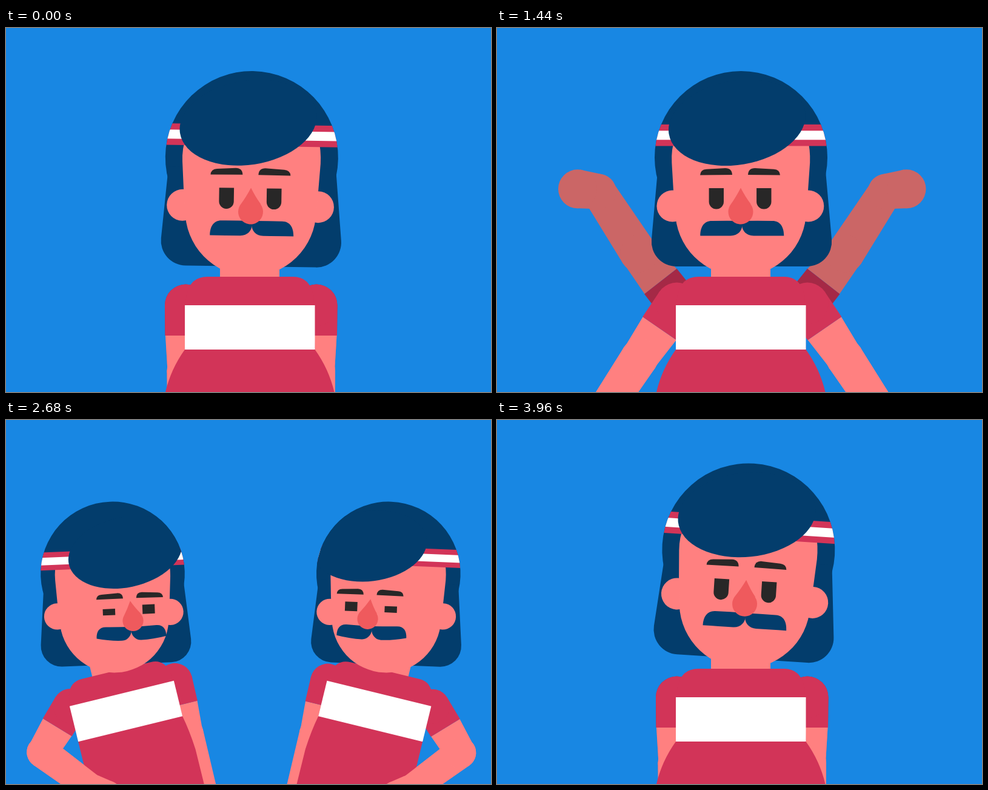
Animation of 800 by 600 pixels, one loop 4 s. Source, as an HTML page with a canvas:

```html
<!DOCTYPE html>
<html lang="en">
<head>
<meta charset="utf-8">
<title>Two brothers</title>
<style>
html, body { margin: 0; width: 100%; height: 100%; overflow: hidden; background: #1887e3; }
canvas { display: block; width: 800px; height: 600px; }
</style>
</head>
<body>
<canvas id="stage" width="800" height="600"></canvas>
<script>
const ctx = document.getElementById('stage').getContext('2d');
const LOOP = 4000, RAD = Math.PI / 180, TAU = Math.PI * 2;
const BLUE = '#1887e3', HAIR = '#033d6c', INK = '#282727', NOSE = '#ef5a5d', THUMB = '#f28585';
const SKIN = '#ff8080', RED = '#d23458';
const SKIN_SHADES = [[255, 128, 128], [203, 102, 102]], RED_SHADES = [[210, 52, 88], [165, 41, 70]];

const lerp = (a, b, k) => a + (b - a) * k;
const ease = k => k < .5 ? 4 * k * k * k : 1 - Math.pow(2 - 2 * k, 3) / 2;
const mix = ([a, b], k) => `rgb(${a.map((v, i) => Math.round(lerp(v, b[i], k)))})`;

function track(keys, t) {
  if (t <= keys[0][0]) return keys[0][1];
  for (let i = 1; i < keys.length; i++) {
    const [t0, v0] = keys[i - 1], [t1, v1] = keys[i];
    if (t < t1) return lerp(v0, v1, ease((t - t0) / (t1 - t0)));
  }
  return keys[keys.length - 1][1];
}

// Poses: upper arm, forearm and hand angle from straight down, shoulder drop
const HANG = [0, 1, 0, 0], UP = [142, 147, 97, 0], UP2 = [142, 155, 99, 0], DOWN = [34.5, 33.5, 30, -3],
  WIDE = [56.5, 54.6, 48, 26], AKIMBO = [79, 7, -45, -12], HIP = [45, -40, -48, 0], RAISED = [17.5, 162, 160, 0];
const LAG = [0, 45, 90, 0];

const frontStart = [[30, HANG], [370, UP], [620, UP], [1020, DOWN], [1720, DOWN], [2150, UP2], [2290, UP2]];
const backStart = [[30, HANG], [390, WIDE], [560, WIDE], [1020, UP], [1720, UP], [2180, AKIMBO], [2290, AKIMBO]];
const outerEnd = [[2570, HIP], [3440, HIP], [3820, HANG]];
const innerEnd = [[2570, HANG], [2800, HANG], [3110, RAISED], [3430, RAISED], [3820, HANG]];
const ARMS = {
  front: { outer: [...frontStart, ...outerEnd], inner: [...frontStart, ...innerEnd] },
  back: { outer: [...backStart, ...outerEnd], inner: [...backStart, ...innerEnd] }
};
const SPLIT = [[2290, 0], [2640, 1], [3450, 1], [3860, 0]];
const LOOK = [[2300, 0], [2560, 1], [2700, 1], [2920, 0]];
const LID = [[2540, 1], [2660, .36], [2710, .36], [2820, 1]];
const SMIRK = [[2900, 0], [3160, 1], [3430, 1], [3640, 0]];
const GRIN = [[3020, 0], [3280, 1], [3420, 1], [3600, 0]];
const FINGER = [[3040, 0], [3200, 1], [3430, 1], [3560, 0]];
const DROOP = [[2150, 0], [2280, 4], [2640, -4], [2700, -4], [2900, 0]];
const BOB = [[1900, 0], [2200, -2], [2290, -2], [2640, 1], [2720, 1], [3000, -2], [3450, -2], [3860, 0]];
const THUMB_TILT = [[2000, 0], [2260, 20], [3000, 0]];
const TILT = {
  front: [[0, .85], [1400, 0], [2290, 0], [2640, 2.3], [3450, 2.3], [3760, 10], [3850, 10], [3920, 7.5], [3960, 3.7], [4000, .85]],
  back: [[0, .85], [1400, 0], [2290, 0], [2640, -2.3], [3450, -2.3], [3800, 10]]
};
const NOD_LEAD = 150; // the front brother lifts his head first

function shape(color, draw) {
  ctx.fillStyle = color;
  ctx.beginPath();
  draw();
  ctx.fill();
}
const disc = (x, y, r, color) => shape(color, () => ctx.arc(x, y, r, 0, TAU));
const box = (x, y, w, h, r, color) => shape(color, () => ctx.roundRect(x, y, w, h, r));
function group(draw) {
  ctx.save();
  draw();
  ctx.restore();
}

function bar(a, ra, b, rb, color) {
  const d = Math.atan2(b[1] - a[1], b[0] - a[0]), nx = -Math.sin(d), ny = Math.cos(d);
  shape(color, () => {
    ctx.moveTo(a[0] + nx * ra, a[1] + ny * ra);
    ctx.lineTo(b[0] + nx * rb, b[1] + ny * rb);
    ctx.lineTo(b[0] - nx * rb, b[1] - ny * rb);
    ctx.lineTo(a[0] - nx * ra, a[1] - ny * ra);
  });
}
function limb(a, ra, b, rb, color) {
  bar(a, ra, b, rb, color);
  disc(...a, ra, color);
  disc(...b, rb, color);
}
const reach = ([x, y], deg, len) => [x - Math.sin(deg * RAD) * len, y + Math.cos(deg * RAD) * len];

function fist(wrist, deg, grow, skin) {
  group(() => {
    ctx.translate(...wrist);
    ctx.rotate(-(180 - deg - 4.3) * RAD);
    if (grow > 0) {
      const top = lerp(-55, -103, grow);
      box(-11, top, 23, -40 - top, [11.5, 11.5, 0, 0], skin);
      if (grow > .4) box(-7, top + 5, 15, 12, [2, 2, 6, 6], '#fff');
    }
    box(-47, -50, 30, 45, [9, 5, 5, 20], skin);
    box(-38, -60, 77, 62, [15, 15, 18, 18], skin);
  });
}

function arm(pose, o, foreOnly) {
  const [a1, a2, a3, drop] = pose;
  // A lifted arm pulls the shoulder inward
  const shoulder = [296.5 + Math.max(0, a1 - 80) / 15, 457 + drop];
  const elbow = reach(shoulder, a1, 108), wrist = reach(elbow, a2, 122);
  if (!foreOnly) {
    const cuff = reach(shoulder, a1, 50);
    bar(cuff, 33.5, elbow, 30, o.skin);
    bar(shoulder, 34.5, cuff, 34, o.red);
    disc(...shoulder, 34.5, o.red);
  }
  limb(elbow, 31, wrist, 28, o.skin);
  if (o.fist) return fist(wrist, a2, o.finger, o.skin);
  limb(wrist, 29, reach(wrist, a3, 35), 32, o.skin);
  if (o.thumb && a3 > 70) {
    const base = [wrist[0] - 6 + o.nudge, wrist[1] - 4], tip = reach(base, 180 + o.thumbTilt, -37);
    const up = [2 * base[0] - tip[0], 2 * base[1] - tip[1]];
    limb(base, 16, up, 16, THUMB);
  }
}
function side(right, draw) {
  group(() => {
    if (right) {
      ctx.translate(808.5, 0);
      ctx.scale(-1, 1);
    }
    draw();
  });
}

function torso(bulgeL, bulgeR) {
  shape(RED, () => {
    ctx.moveTo(295, 457);
    ctx.lineTo(298, 440);
    ctx.quadraticCurveTo(304, 410, 332, 410);
    ctx.lineTo(474, 410);
    ctx.quadraticCurveTo(500, 410, 507, 440);
    ctx.lineTo(509.5, 530);
    ctx.quadraticCurveTo(509.5 + 23 * bulgeR, 562, 509.5 + 32 * bulgeR, 600);
    ctx.lineTo(509.5 + 34 * bulgeR, 760);
    ctx.lineTo(295 - 34 * bulgeL, 760);
    ctx.lineTo(295 - 32 * bulgeL, 600);
    ctx.quadraticCurveTo(295 - 23 * bulgeL, 562, 295, 530);
  });
  ctx.fillStyle = '#fff';
  ctx.fillRect(295, 457, 214.5, 73);
}

function backHair() {
  disc(402.5, 213.5, 142.5, HAIR);
  shape(HAIR, () => {
    ctx.moveTo(265.5, 230);
    ctx.arcTo(251, 393, 400, 393, 41);
    ctx.arcTo(556, 393, 541.5, 230, 41);
    ctx.lineTo(541.5, 230);
  });
}

function brow(x, y, flip) {
  group(() => {
    ctx.translate(x, y);
    ctx.scale(flip, 1);
    shape(INK, () => {
      ctx.moveTo(-26.5, 5.5);
      ctx.quadraticCurveTo(-26, -3.5, -16, -4.2);
      ctx.lineTo(15, -6);
      ctx.quadraticCurveTo(26, -6, 26.5, 5);
    });
  });
}

function eye(x, bottom, lid, wide) {
  const h = (34.5 + 16 * wide) * lid;
  const low = 12.2 * Math.max(0, lid - .55) / .45, high = 12.2 * wide;
  box(x - 12.2, bottom - h, 24.4, h, [high, high, low, low], INK);
}

function moustache(droop) {
  for (const flip of [1, -1]) group(() => {
    ctx.translate(404.3, 0);
    ctx.scale(flip, 1);
    shape(HAIR, () => {
      ctx.moveTo(.3, 318);
      ctx.quadraticCurveTo(-25, 317.5, -50, 318 + droop * .4);
      ctx.bezierCurveTo(-63, 318 + droop * .5, -69, 328 + droop, -69, 342.5 + droop);
      ctx.quadraticCurveTo(-42, 342.5 - droop * .5, -19, 342.5 - droop * .5);
      ctx.bezierCurveTo(-7, 342.5 - droop * .5, 0, 334, .3, 325);
    });
  });
}

function face({ look, nod, smirk, lid, grin, droop, dir }) {
  const lx = look * 33 * dir, squint = 1 - lid;
  disc(289.5, 293.5, 26, SKIN);
  disc(513.3, 293.5, 26, SKIN);
  shape(SKIN, () => {
    ctx.moveTo(294, 180);
    ctx.quadraticCurveTo(287, 200, 288.3, 222);
    ctx.lineTo(291, 268);
    ctx.lineTo(294, 301);
    ctx.arc(402, 301, 108, Math.PI, 0, true);
    ctx.lineTo(513, 268);
    ctx.lineTo(516.2, 222);
    ctx.quadraticCurveTo(517, 200, 512, 180);
  });
  group(() => {
    ctx.beginPath();
    ctx.arc(402.5, 213.5, 142.5, 0, TAU);
    ctx.clip();
    const y = 159 + nod * 7;
    ctx.fillStyle = RED;
    ctx.fillRect(250, y, 310, 35.5);
    ctx.fillStyle = '#fff';
    ctx.fillRect(250, y + 10.3, 310, 15);
    shape(HAIR, () => ctx.ellipse(396 + lx, 156 + nod * 16, 114, 69.5, -9.6 * RAD, 0, TAU));
  });
  const outerLeft = dir > 0;
  group(() => {
    ctx.translate(lx, nod * 9 + squint * 19);
    brow(361.5, 237 + smirk * (outerLeft ? -3 : 13), 1);
    brow(440.5, 237 + smirk * (outerLeft ? 13 : -3), -1);
  });
  group(() => {
    ctx.translate(lx * .92, nod * 7);
    const inner = Math.min(1, lid + .17), bottom = 298.5 - squint * 16;
    eye(361.8, bottom, outerLeft ? lid : inner, outerLeft ? smirk : 0);
    eye(440.3, bottom, outerLeft ? inner : lid, outerLeft ? 0 : smirk);
  });
  if (grin > 0) shape('#fff', () => ctx.arc(404, 328, grin, 0, Math.PI));
  group(() => {
    ctx.translate(lx * .92, nod * 2);
    moustache(droop);
  });
  group(() => {
    ctx.translate(402 + lx * 1.12, 303 + nod * 5);
    ctx.rotate(-6 * look * dir * RAD);
    shape(NOSE, () => {
      ctx.moveTo(0, -39.5);
      ctx.quadraticCurveTo(8, -24, 16.5, -13);
      ctx.arc(0, 0, 20.5, -.65, Math.PI + .65);
      ctx.quadraticCurveTo(-8, -24, 0, -39.5);
    });
  });
}

function person(name, t, p) {
  const back = name === 'back', dir = back ? 1 : -1, shade = back ? 1 - p : 0;
  const pose = kind => LAG.map((lag, i) => track(ARMS[name][kind].map(([k, v]) => [k, v[i]]), t - lag));
  const style = {
    skin: mix(SKIN_SHADES, shade), red: mix(RED_SHADES, shade),
    thumb: !back, thumbTilt: track(THUMB_TILT, t), finger: track(FINGER, t)
  };
  const kinds = back ? ['outer', 'inner'] : ['inner', 'outer'];
  const drawArm = (i, foreOnly) => side(i === 1, () => arm(pose(kinds[i]), {
    ...style, nudge: i ? 3 : 0, fist: kinds[i] === 'inner' && t > 2700 && t < 3800
  }, foreOnly));
  const inBody = draw => group(() => {
    ctx.translate(lerp(402.25, back ? 198 : 608.3, p), lerp(493.5, 480, p));
    ctx.rotate(-13.7 * dir * p * RAD);
    const s = lerp(1, .825, p);
    ctx.scale(s, s);
    ctx.translate(-402.25, -493.5);
    draw();
  });
  const inHead = draw => group(() => {
    ctx.translate(lerp(402, back ? 182 : 624, p), lerp(405, 412, p) + track(BOB, t));
    ctx.rotate(track(TILT[name], t) * RAD);
    const s = lerp(1, .834, p);
    ctx.scale(s, s);
    ctx.translate(-402, -405);
    draw();
  });
  const hidden = back && p === 0;

  if (!hidden) inHead(backHair);
  inBody(() => {
    if (!hidden) {
      ctx.fillStyle = SKIN;
      ctx.fillRect(353, 370, 98, 50);
    }
    drawArm(0);
    drawArm(1);
    if (hidden) return;
    const outer = 1 - p, inner = lerp(1, .3, p);
    torso(back ? outer : inner, back ? inner : outer);
    if (p > .5) drawArm(kinds.indexOf('outer'), true);
  });
  if (hidden) return;
  // The chin only rests on the shirt once the bodies lean apart
  inHead(() => {
    if (p === 0) {
      ctx.beginPath();
      ctx.rect(200, 0, 420, 410 - track(BOB, t));
      ctx.clip();
    }
    face({
      look: track(LOOK, t), nod: track(LOOK, back ? t : t + NOD_LEAD) * (p > 0 ? 1 : 0), dir,
      lid: track(LID, t), smirk: track(SMIRK, t),
      grin: track(GRIN, t) * (back ? 41 : 51), droop: track(DROOP, t)
    });
  });
}

function frame(now) {
  const t = now % LOOP, p = track(SPLIT, t);
  ctx.fillStyle = BLUE;
  ctx.fillRect(0, 0, 800, 600);
  person('back', t, p);
  person('front', t, p);
  requestAnimationFrame(frame);
}
requestAnimationFrame(frame);
</script>
</body>
</html>
```
